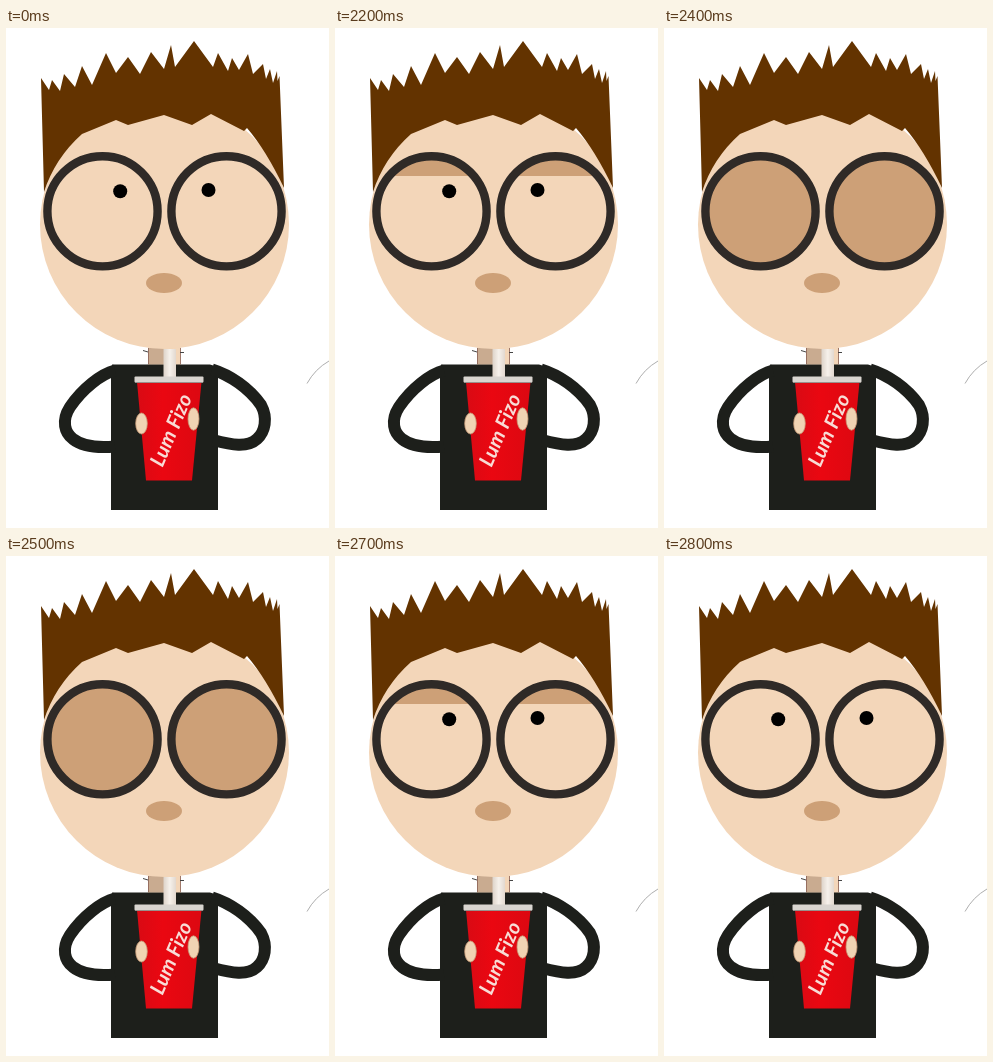
Animation, 323 px wide and 500 px high, one loop 2900 ms. Source, as an HTML page:

```html
<!DOCTYPE html>
<html lang="en">
<head>
<meta charset="utf-8">
<title>Blinking man with a drink</title>
<style>
  html, body { margin: 0; width: 100%; height: 100%; overflow: hidden; background: #fff; }
  svg { display: block; width: 100vw; height: 100vh; }
  .skin { fill: #f3d6b9; }
  .shade { fill: #cda077; }
  .hair { fill: #633300; }
  .shirt { fill: #1d1f1b; }
  .arm { fill: none; stroke: #1d1f1b; stroke-width: 12; }
  .rim { fill: none; stroke: #2f2a27; stroke-width: 8.4; }
  .hand { fill: #f0d3b3; stroke: #c79a76; stroke-width: .8; }
  .label { font: italic 700 20.5px Lato, "Open Sans", sans-serif; fill: #f8dcd6; text-anchor: middle; }
  .lids { animation: blink 2900ms step-end infinite; }
  /* lid edge: open, 148, 196, shut, 196, 148, open */
  @keyframes blink {
    0% { transform: translateY(120px); }
    75.86% { transform: translateY(148px); }
    79.31% { transform: translateY(196.5px); }
    82.758% { transform: translateY(245px); }
    89.655% { transform: translateY(196.5px); }
    93.103% { transform: translateY(148px); }
    96.551%, 100% { transform: translateY(120px); }
  }
</style>
</head>
<body>
<svg viewBox="0 0 323 500">
  <defs>
    <clipPath id="lenses">
      <circle cx="96.5" cy="183.3" r="53"/>
      <circle cx="220.5" cy="183.3" r="53"/>
    </clipPath>
    <linearGradient id="red">
      <stop offset="0" stop-color="#d90a14"/>
      <stop offset=".4" stop-color="#ea0711"/>
      <stop offset="1" stop-color="#dc0811"/>
    </linearGradient>
    <linearGradient id="straw">
      <stop offset="0" stop-color="#ddd3c9"/>
      <stop offset=".5" stop-color="#f6f1eb"/>
      <stop offset="1" stop-color="#e2d8cf"/>
    </linearGradient>
  </defs>

  <path d="M301 355.5Q309 341 323 333" fill="none" stroke="#999" stroke-width=".8"/>

  <!-- neck, body and arms -->
  <rect class="skin" x="142" y="316" width="33" height="21"/>
  <rect x="142" y="320" width="16" height="16" fill="#c9ab90"/>
  <path d="M142.5 320V336M174.5 320V336" stroke="#8a6055" stroke-width=".8"/>
  <path d="M137 322.5L142 324M174 324.5H178" stroke="#444"/>
  <path class="shirt" d="M106 336.5H204L212 339V482H105V343Z"/>
  <path class="arm" d="M109 342.5C95 346 76 361 64 379C55 393 59 405 67 411C77 419 92 420 109 418.5"/>
  <path class="arm" d="M206 341.5C224 347 243 360 255 377C262 390 259 404 251 411C241 420 226 417 207 412"/>

  <!-- head -->
  <circle class="skin" cx="158.5" cy="196.5" r="124.5"/>
  <path class="hair" d="M35 50L43 62L46 52L54 63L58 46L69 59L76 38L86 57L100 25L110 45L122 29L134 46L145 24
    L158 41L165 17L169 39L188 13L207 39L212 25L222 43L226 30L233 42L242 26L247 46L257 36L260 51L264 41
    L267 55L271 43L271.500 53L273.500 48L278 160Q260 122 241 100L238 103L205 86L186 97L158 87L122 97L110 92
    L76 106Q49 130 38 164Z"/>
  <circle class="skin" cx="96.5" cy="183.3" r="53"/>
  <circle class="skin" cx="220.5" cy="183.3" r="53"/>
  <circle cx="114.2" cy="163.3" r="7"/>
  <circle cx="202.5" cy="162" r="7"/>
  <g clip-path="url(#lenses)">
    <rect class="lids shade" x="30" y="-130" width="260" height="130"/>
  </g>
  <circle class="rim" cx="96.5" cy="183.3" r="55.1"/>
  <circle class="rim" cx="220.5" cy="183.3" r="55.1"/>
  <ellipse class="shade" cx="158" cy="255" rx="18" ry="10"/>

  <!-- drink -->
  <rect x="157.5" y="321" width="12.5" height="29" fill="url(#straw)"/>
  <path d="M131 354H195.500L186 452.500H140Z" fill="url(#red)"/>
  <rect x="128.5" y="348.5" width="69" height="6" rx="1" fill="#d9d5d0"/>
  <path d="M129 354.5H197" stroke="#99908c"/>
  <text class="label" transform="translate(165 402) rotate(-67)" y="7">Lum Fizo</text>
  <ellipse class="hand" cx="135.5" cy="395.5" rx="5.8" ry="10.5"/>
  <ellipse class="hand" cx="187.5" cy="391" rx="5.5" ry="11.2"/>
</svg>
</body>
</html>
```
